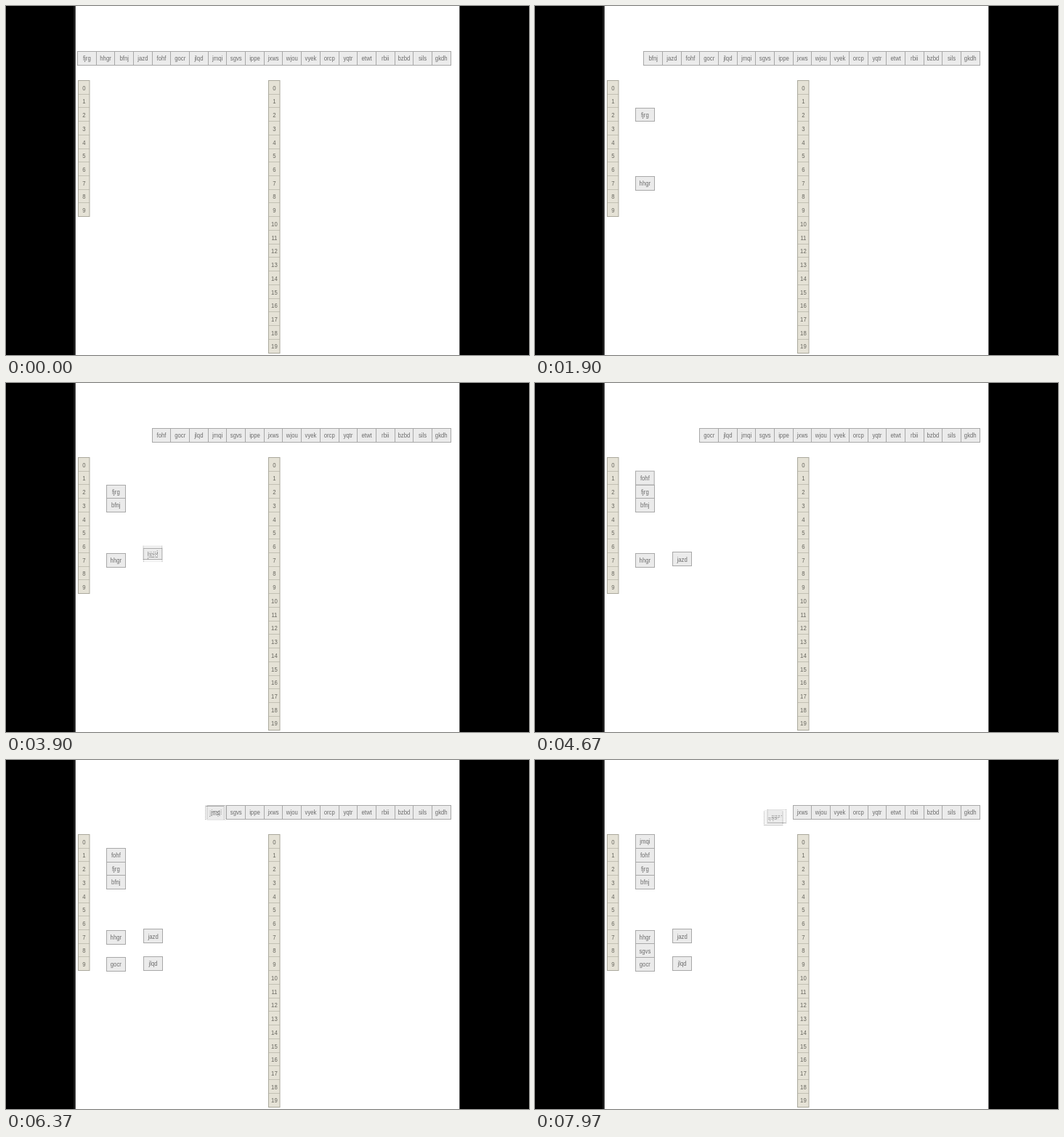
Animation, 720 px wide and 480 px high, one loop 8000 ms. Source, as an HTML page with a canvas:

```html
<!DOCTYPE html>
<html lang="en">
<head>
<meta charset="utf-8">
<title>Hash buckets</title>
<style>
html, body { margin: 0; width: 100%; height: 100%; overflow: hidden; background: #000; }
canvas { display: block; }
</style>
</head>
<body>
<canvas id="stage" width="720" height="480"></canvas>
<script>
const ctx = document.getElementById('stage').getContext('2d');
const LOOP = 8000, FPS = 30, FIELD = 8.3;
const W = 25.68, H = 18.9, ROW = 18.73;
const words = ('fjrg hhgr bfnj jazd fohf gocr jlqd jmqi sgvs ippe ' +
  'jxws wjou vyek orcp yqtr etwt rbii bzbd sils gkdh').split(' ');

// start, end, bucket, place in the bucket's chain
const moves = [
  [267, 863, 2, 0], [1270, 1890, 7, 0], [2667, 3163, 3, 0], [3507, 3963, 7, 1],
  [4237, 4663, 1, 0], [4907, 5333, 9, 0], [5605, 6003, 9, 1], [6337, 6733, 0, 0],
  [7050, 7563, 8, 0], [7889, 8319, 2, 1]
];

// Both fields of interlaced video: even lines, then odd lines
const fields = [0, 1].map(odd => {
  const lines = new Path2D();
  for (let y = odd; y < 480; y += 2) lines.rect(0, y, 720, 1);
  return lines;
});

const snap = v => Math.floor(v) + 0.5;

function label(text, x, y) {
  ctx.save();
  ctx.translate(x, y);
  ctx.scale(0.86, 1); // narrow video pixels
  ctx.fillText(text, 0, 0);
  ctx.restore();
}

function card(text, [x, y], fit = snap) {
  const left = fit(x), top = fit(y);
  const w = fit(x + W) - left, h = fit(y + H) - top;
  ctx.fillStyle = '#ebebeb';
  ctx.strokeStyle = '#a8a8a8';
  ctx.fillRect(left, top, w, h);
  ctx.strokeRect(left, top, w, h);
  ctx.fillStyle = '#6c6c6c';
  label(text, x + W / 2, y + 12.6);
}

function column(x, count) {
  const h = snap(102.4 + ROW * count) - 102.5;
  ctx.fillStyle = '#e5e2d6';
  ctx.fillRect(x, 102.5, 15.5, h);
  ctx.fillStyle = '#c2c0b3';
  for (let i = 1; i < count; i++) ctx.fillRect(x, Math.floor(102.4 + ROW * i), 15.5, 1);
  ctx.strokeStyle = '#aaa89c';
  ctx.strokeRect(x, 102.5, 15.5, h);
  ctx.fillStyle = '#68675f';
  for (let i = 0; i < count; i++) label(i, x + 7.9, 115.6 + ROW * i);
}

function place(i, t) {
  const x = 98.5 + W * i, y = 62.5;
  if (!moves[i]) return [x, y];
  const [start, end, bucket, depth] = moves[i];
  const u = Math.min(1, Math.max(0, (t - start) / (end - start)));
  const p = (1 - Math.cos(Math.PI * u)) / 2;
  const toX = 138.5 + 51.3 * depth;
  const toY = 102.35 + 18.83 * bucket - 1.2 * depth;
  return [x + (toX - x) * p, y + (toY - y) * p];
}

function draw(t) {
  ctx.fillStyle = '#000';
  ctx.fillRect(0, 0, 720, 480);
  ctx.fillStyle = '#1c1c1c';
  ctx.fillRect(93, 0, 2, 480);
  ctx.fillStyle = '#555';
  ctx.fillRect(95, 0, 530, 480);
  ctx.fillStyle = '#fff';
  ctx.fillRect(96, 0, 528, 480);
  column(99.5, 10);
  column(361.5, 20);

  let moving = -1;
  words.forEach((word, i) => {
    const m = moves[i];
    if (m && t + FIELD > m[0] && t - FIELD < m[1]) moving = i;
    else card(word, place(i, t));
  });
  if (moving < 0) return;
  fields.forEach((lines, odd) => {
    ctx.save();
    ctx.clip(lines);
    card(words[moving], place(moving, t + (odd ? FIELD : -FIELD)), v => v);
    ctx.restore();
  });
}

ctx.font = '9px "Liberation Sans", Arial, sans-serif';
ctx.textAlign = 'center';
ctx.lineWidth = 1;

const origin = performance.now();
function tick() {
  const t = (performance.now() - origin) % LOOP;
  const step = Math.floor((t + 4) * FPS / 1000);
  draw(step * 1000 / FPS + 3);
  requestAnimationFrame(tick);
}
tick();
</script>
</body>
</html>
```
